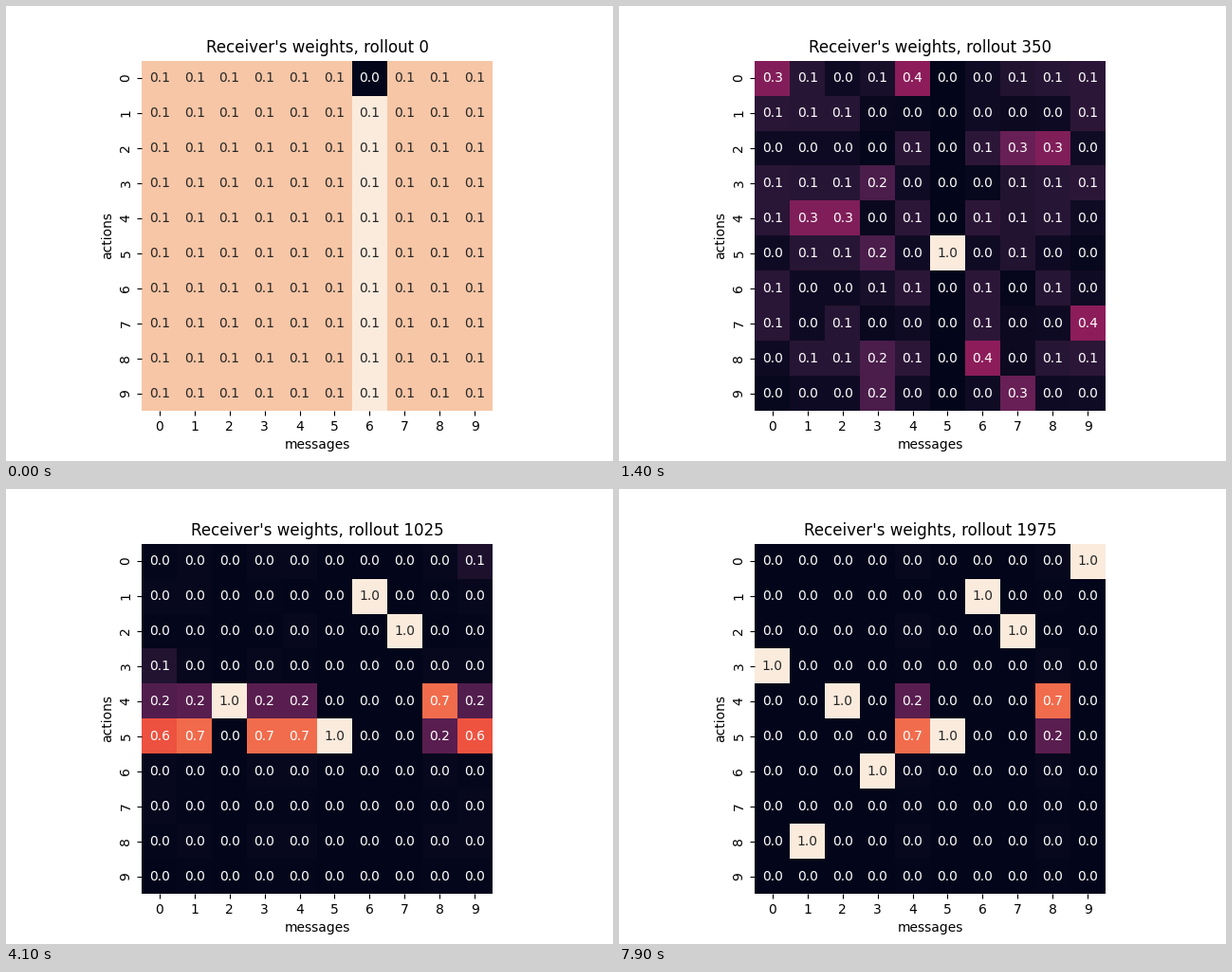
Write a matplotlib script that moves like this. It is 640 by 480 pixels and loops after 8000 ms.

```python
import numpy as np
import matplotlib.pyplot as plt
from matplotlib.animation import FuncAnimation
from matplotlib.colors import LinearSegmentedColormap

N = 10
FRAMES = 80
ROLLOUTS_PER_FRAME = 25
BOOST = .8


def make_cmap():
    """Dark navy through crimson to cream, from evenly spaced palettes."""
    palettes = [
        "#4c1d4b #a11a5b #e83f3f #f69c73",
        "#35193e #701f57 #ad1759 #e13342 #f37651 #f6b48f",
        "#221331 #451c47 #691f55 #921c5b #b91657 #d92847 #ed503e #f47d57"
        " #f6a47c #f7c9aa",
    ]
    stops = [(0, "#03051a"), (1, "#faebdd")]
    for palette in palettes:
        colors = palette.split()
        stops += [((k + 1) / (len(colors) + 1), c) for k, c in enumerate(colors)]
    return LinearSegmentedColormap.from_list("ember", sorted(stops), N=256)


# Every failed try divides an action's weight by three.
rng = np.random.default_rng(7)
usual_fails = np.repeat([1., 2., 3.], [5, 4, 1])
background = np.column_stack([rng.permutation(usual_fails) for _ in range(N)])


def fails(leaders, depth=0, gap=0):
    """Fail counts where each message's leading actions stand out.

    Leaders are gap apart; one that is named twice gets a boost.
    """
    f = background + depth
    for j, group in enumerate(leaders):
        for k, action in enumerate(group):
            f[action, j] = gap * k - BOOST * (group.count(action) - 1)
    return f


first_try = np.zeros((N, N))
first_try[0, 6] = 1

KEY_STEPS = [0, 8, 14, 24, 41]
KEY_FAILS = [
    first_try,
    fails([[0, 3, 6, 7, 8], [0, 1, 3, 6], [4], [8], [8], [7],
           [2, 3, 4, 8, 9], [2, 7, 9], [3, 3], [2, 4, 5, 7, 8, 9]]),
    fails([[0], [4], [4], [3, 5, 8, 9], [0], [5], [8], [2, 9], [2], [7]]),
    fails([[5], [8], [4], [5], [5, 9], [5], [3, 4, 5], [2, 5], [4], [5, 5]],
          depth=.4),
    fails([[5, 4]] * 8 + [[4, 5], [5, 4]], depth=2.5, gap=1),
]

# message: (action that takes over, first step, last step)
WINS = {
    5: (5, 8, 14), 2: (4, 14, 20), 7: (2, 26, 34), 6: (1, 26, 36),
    3: (6, 41, 45), 0: (3, 40, 53), 9: (0, 40, 56), 1: (8, 55, 63),
}


def progress(i, first, last):
    return np.clip((i - first) / (last - first), 0, 1)


def matrix_at(i):
    f = KEY_FAILS[0]
    for goal, first, last in zip(KEY_FAILS[1:], KEY_STEPS, KEY_STEPS[1:]):
        f = f + (goal - f) * progress(i, first, last)
    m = 3. ** -f
    m /= m.sum(axis=0)
    for j, (action, first, last) in WINS.items():
        p = progress(i, first, last)
        m[:, j] *= 1 - p
        m[action, j] += p
    return m


def luminance(rgb):
    lin = np.where(rgb <= .03928, rgb / 12.92, ((rgb + .055) / 1.055) ** 2.4)
    return lin @ [.2126, .7152, .0722]


plt.rcParams["font.family"] = "DejaVu Sans"
fig, ax = plt.subplots(figsize=(6.4, 4.8), dpi=100)
cmap = make_cmap()
mesh = ax.pcolormesh(matrix_at(0), cmap=cmap)
ax.set(xlim=(0, N), ylim=(N, 0), aspect="equal",
       xlabel="messages", ylabel="actions")
ticks = np.arange(N) + .5
ax.set_xticks(ticks, range(N))
ax.set_yticks(ticks, range(N), rotation=90, va="center")
ax.spines[:].set_visible(False)
title = ax.set_title("")
labels = [ax.text(x, y, "", ha="center", va="center")
          for y in ticks for x in ticks]


def update(i):
    m = matrix_at(i)
    lo, hi = m.min(), m.max()
    mesh.set_array(m)
    mesh.set_clim(lo, hi)
    shades = luminance(cmap((m.ravel() - lo) / (hi - lo))[:, :3])
    for label, value, lum in zip(labels, m.ravel(), shades):
        label.set_text(f"{value:.1f}")
        label.set_color(".15" if lum > .408 else "w")
    title.set_text(f"Receiver's weights, rollout {i * ROLLOUTS_PER_FRAME}")
    return [mesh, title, *labels]


anim = FuncAnimation(fig, update, frames=FRAMES, interval=100,
                     repeat=True, repeat_delay=0, blit=False)
plt.show()
```
